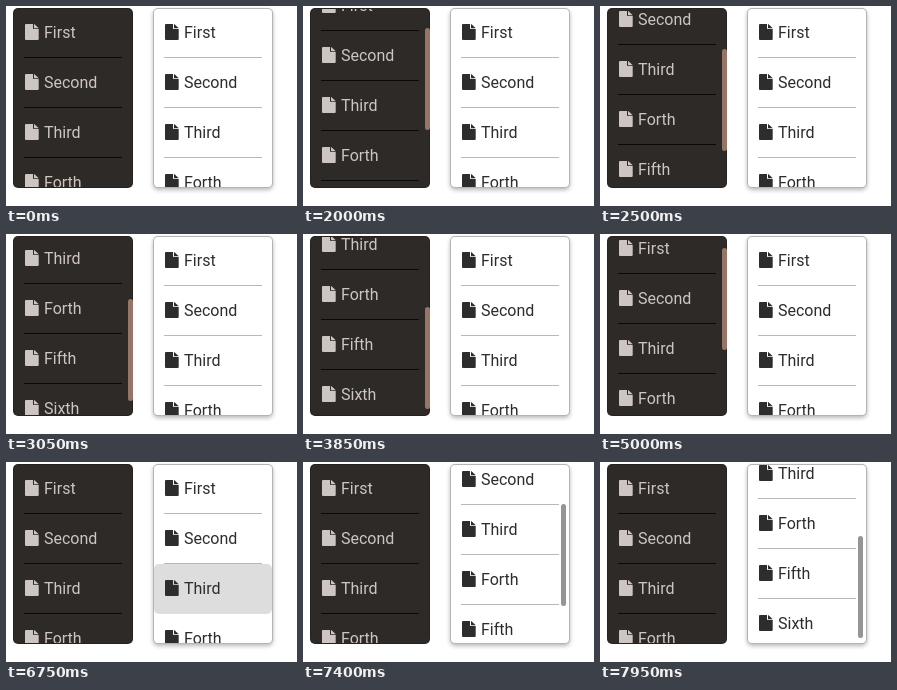
Write an HTML page with a canvas that moves like this. It is 291 px wide and 200 px high and loops after 8 s.

```html
<!DOCTYPE html>
<html lang="en">
<head>
<meta charset="utf-8">
<title>Scrolling lists</title>
<style>
  html, body { margin: 0; width: 100%; height: 100%; overflow: hidden; background: #fff; }
  canvas { display: block; }
</style>
</head>
<body>
<canvas id="stage"></canvas>
<script>
const W = 291, H = 200, LOOP = 8000, STEP = 50;
const ROW = 50, TOP = 2, VIEW = 180, WIDTH = 120;
const LABELS = ['First', 'Second', 'Third', 'Forth', 'Fifth', 'Sixth'];

const dark = {
  x: 7, bg: '#2e2a27', border: '#26221f', text: '#cdc5c1', icon: '#cdc5c1',
  line: '#0b0a09', hover: '#1c1917', thumb: '#977566',
  thumbX: 115, thumbTop: 7,
  hoverAt: [1450, 1800], thumbAt: [1800, 5600],
  path: [[1750, 0], [2000, 27], [3050, 102], [3250, 120],
         [3800, 120], [4350, 79], [5000, 12], [5150, 0]]
};
const light = {
  x: 147, bg: '#ffffff', border: '#b4b4b4', text: '#2d2d2d', icon: '#2d2d2d',
  line: '#b8b8b8', hover: '#dddddd', thumb: '#959595', shadow: true,
  thumbX: 111, thumbTop: 8.8,
  hoverAt: [6750, 7100], thumbAt: [7100, LOOP],
  path: [[7050, 0], [7500, 76], [7800, 111], [7950, 115]]
};

const canvas = document.getElementById('stage');
const ctx = canvas.getContext('2d');
const dpr = window.devicePixelRatio || 1;
canvas.width = W * dpr;
canvas.height = H * dpr;
canvas.style.width = W + 'px';
canvas.style.height = H + 'px';

const within = (t, [from, to]) => t >= from && t < to;

function along(path, t) {
  if (t <= path[0][0]) return path[0][1];
  for (let i = 1; i < path.length; i++) {
    const [t0, v0] = path[i - 1], [t1, v1] = path[i];
    if (t <= t1) return v0 + (v1 - v0) * (t - t0) / (t1 - t0);
  }
  return path[path.length - 1][1];
}

function box(x, y, w, h, r, fill) {
  ctx.beginPath();
  ctx.roundRect(x, y, w, h, r);
  ctx.fillStyle = fill;
  ctx.fill();
}

// Sheet of paper with a folded top right corner
function fileIcon(x, y, color) {
  ctx.fillStyle = color;
  ctx.fill(new Path2D(
    `M${x + 1} ${y}h7v4.2q0 .8 .8 .8h4.9v10q0 1 -1 1h-11.7q-1 0 -1 -1v-14q0 -1 1 -1z` +
    `M${x + 9} ${y}q.5 .1 .8 .4l3.2 3.2q.4 .4 .5 .6h-4.5z`));
}

function drawPanel(p, t) {
  const scroll = Math.round(along(p.path, t));

  ctx.save();
  if (p.shadow) {
    ctx.shadowColor = 'rgba(0,0,0,.28)';
    ctx.shadowBlur = 4 * dpr;
    ctx.shadowOffsetY = 2 * dpr;
  }
  box(p.x, TOP, WIDTH, VIEW, 5, p.border);
  ctx.restore();
  box(p.x + 1, TOP + 1, WIDTH - 2, VIEW - 2, 4, p.bg);

  ctx.save();
  ctx.beginPath();
  ctx.roundRect(p.x + 1, TOP + 1, WIDTH - 2, VIEW - 2, 4);
  ctx.clip();
  LABELS.forEach((label, i) => {
    const y = TOP + i * ROW - scroll;
    const hovered = i === 2 && within(t, p.hoverAt);
    if (hovered) box(p.x + 1, y, WIDTH - 2, ROW, 5, p.hover);
    if (!hovered && i < LABELS.length - 1) {
      ctx.fillStyle = p.line;
      ctx.fillRect(p.x + 11, y + ROW - 1, 98, 1);
    }
    fileIcon(p.x + 12, y + 16, p.icon);
    ctx.fillStyle = p.text;
    ctx.fillText(label, p.x + 31, y + 30);
  });
  ctx.restore();

  if (within(t, p.thumbAt))
    box(p.x + p.thumbX, Math.round(p.thumbTop + scroll * 68 / 120), 5, 102, 2.5, p.thumb);
}

function frame(now) {
  const t = Math.floor((now % LOOP) / STEP) * STEP;
  ctx.setTransform(dpr, 0, 0, dpr, 0, 0);
  ctx.fillStyle = '#fff';
  ctx.fillRect(0, 0, W, H);
  ctx.font = '16px Roboto, sans-serif';
  ctx.textBaseline = 'alphabetic';
  drawPanel(dark, t);
  drawPanel(light, t);
  requestAnimationFrame(frame);
}

const start = performance.now();
requestAnimationFrame(() => {
  const tick = () => frame(performance.now() - start);
  const loop = () => { tick(); };
  loop();
});
</script>
</body>
</html>
```
